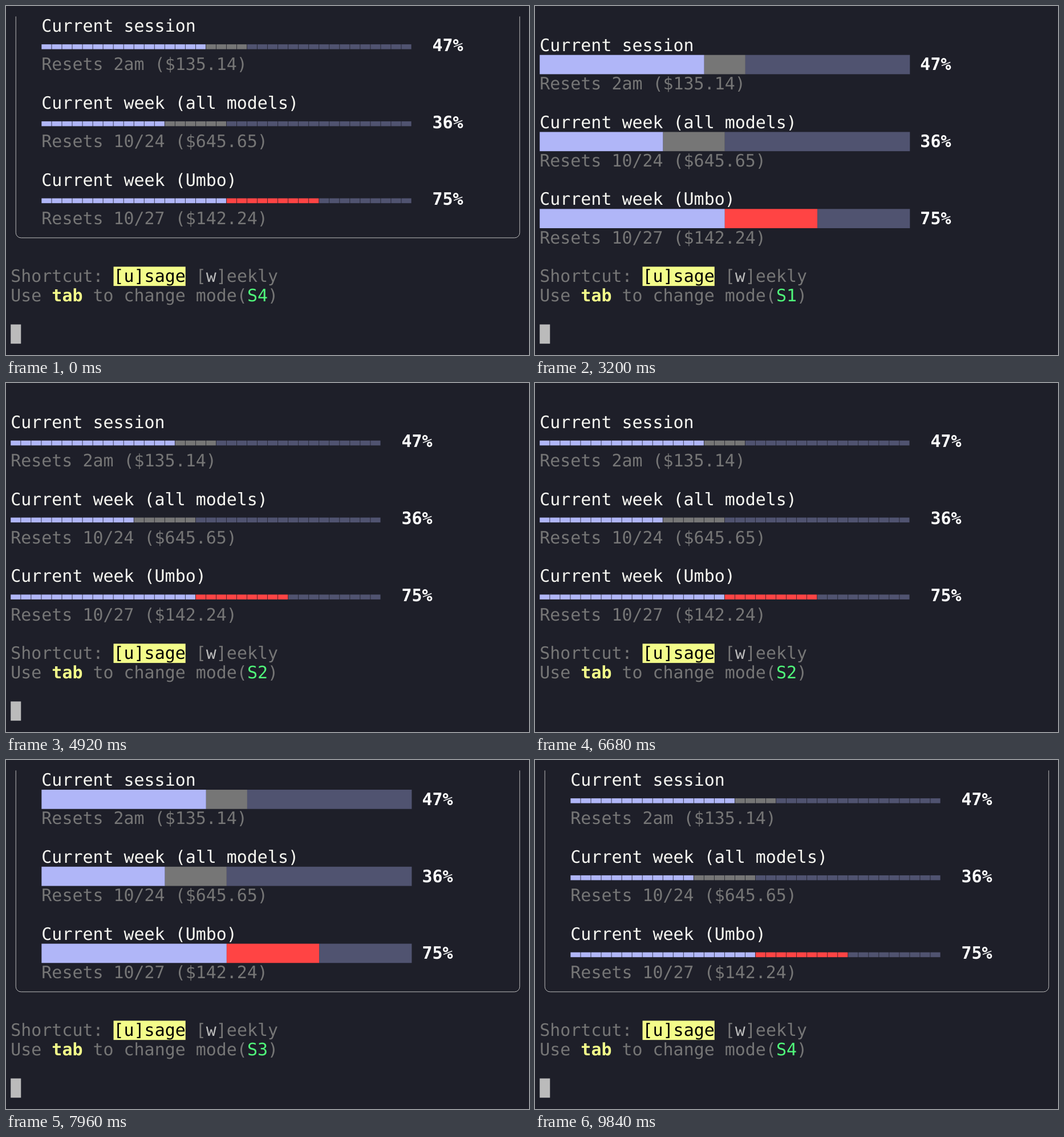
Animation of 917 by 611 pixels, one loop 9.88 s. Source, as an HTML page with a canvas:

```html
<!DOCTYPE html>
<html lang="en">
<head>
<meta charset="utf-8">
<title>Usage monitor</title>
<style>
html, body { margin: 0; height: 100%; overflow: hidden; background: #1e1f29; }
canvas { display: block; }
</style>
</head>
<body>
<canvas id="stage" width="917" height="611"></canvas>
<script>
const ctx = document.getElementById('stage').getContext('2d');
const LOOP = 9880, TICK = 40, BLINK = 585;
const CELL = 18.03, LINE = 33.7, BAR = 36, PROMPT = 16;
const BG = '#1e1f29', FG = '#bbbbbb', GRAY = '#767676', TITLE = '#f8f8f2', WHITE = '#ffffff',
  BLUE = '#b0b6f8', RED = '#ff4444', SLATE = '#505370', YELLOW = '#f3fc8a', GREEN = '#50fa7b';

// moments of a mode change; the modes run 4, 1, 2, 3, 4
const starts = [-305, 842, 3745, 6780, 9820];

// title, reset note, percent used, cells of time passed
const meters = [
  ['Current session', 'Resets 2am ($135.14)', 47, 20],
  ['Current week (all models)', 'Resets 10/24 ($645.65)', 36, 18],
  ['Current week (Umbo)', 'Resets 10/27 ($142.24)', 75, 18]
];

const colX = col => 8.25 + col * CELL;
const rowY = row => 18.3 + row * LINE;

function text(str, col, row, color, bold) {
  ctx.font = (bold ? 'bold ' : '') + '29.95px "DejaVu Sans Mono", monospace';
  ctx.textRendering = 'geometricPrecision';
  ctx.fillStyle = color;
  ctx.fillText(str, colX(col), rowY(row) + 26.7);
}

// writes [string, colour, bold] parts one after another
function line(row, ...parts) {
  let col = 0;
  for (const [str, color, bold] of parts) {
    text(str, col, row, color, bold);
    col += str.length;
  }
}

function block(col, row, cells, color) {
  ctx.fillStyle = color;
  ctx.fillRect(colX(col), rowY(row), cells * CELL, LINE);
}

function bar(col, row, from, to, color, thin) {
  if (!thin) return block(col + from, row, to - from, color);
  ctx.fillStyle = color;
  for (let i = from; i < to; i++) ctx.fillRect(colX(col + i), rowY(row) + 15.1, CELL - 0.8, 8.5);
}

function border() {
  const left = colX(0.5), right = colX(49.5), top = rowY(0), bottom = rowY(11.5), r = 9;
  ctx.strokeStyle = FG;
  ctx.lineWidth = 1;
  ctx.beginPath();
  ctx.moveTo(left, top);
  ctx.arcTo(left, bottom, right, bottom, r);
  ctx.arcTo(right, bottom, right, top, r);
  ctx.lineTo(right, top);
  ctx.stroke();
}

function meter([title, note, percent, passed], col, row, thin) {
  const used = Math.floor(BAR * percent / 100);
  const low = Math.min(used, passed), high = Math.max(used, passed);
  text(title, col, row, TITLE);
  bar(col, row + 1, 0, low, BLUE, thin);
  bar(col, row + 1, low, high, used > passed ? RED : GRAY, thin);
  bar(col, row + 1, high, BAR, SLATE, thin);
  text(percent + '%', col + BAR + (thin ? 2 : 1), row + 1, WHITE, true);
  text(note, col, row + 2, GRAY);
}

function screen(mode) {
  const boxed = mode > 2, thin = mode % 2 === 0;
  if (boxed) border();
  meters.forEach((m, i) => meter(m, boxed ? 3 : 0, i * 4 + (boxed ? 0 : 1), thin));
  block(10, 13, 7, YELLOW);
  line(13, ['Shortcut: ', GRAY], ['[u]sage', '#000000'], [' [', GRAY], ['w', FG], [']eekly', GRAY]);
  line(14, ['Use ', GRAY], ['tab', YELLOW, true], [' to change mode(', GRAY], ['S' + mode, GREEN], [')', GRAY]);
}

function draw(now) {
  const t = Math.floor(now % LOOP / TICK) * TICK;
  const i = starts.findLastIndex(s => s < t + TICK);
  const mode = (i + 3) % 4 + 1, age = t - starts[i];
  const changing = age < 0, first = mode === 1;
  ctx.fillStyle = BG;
  ctx.fillRect(0, 0, 917, 611);
  // a change clears the screen for one tick, the first mode is redrawn from the top instead
  if (!changing || first) screen(mode);
  if (changing || Math.floor(age / BLINK) % 2 === 0) block(0, changing && first ? 0 : PROMPT, 1, FG);
}

const begin = performance.now();
function tick() {
  draw(performance.now() - begin);
  requestAnimationFrame(tick);
}
tick();
</script>
</body>
</html>
```
